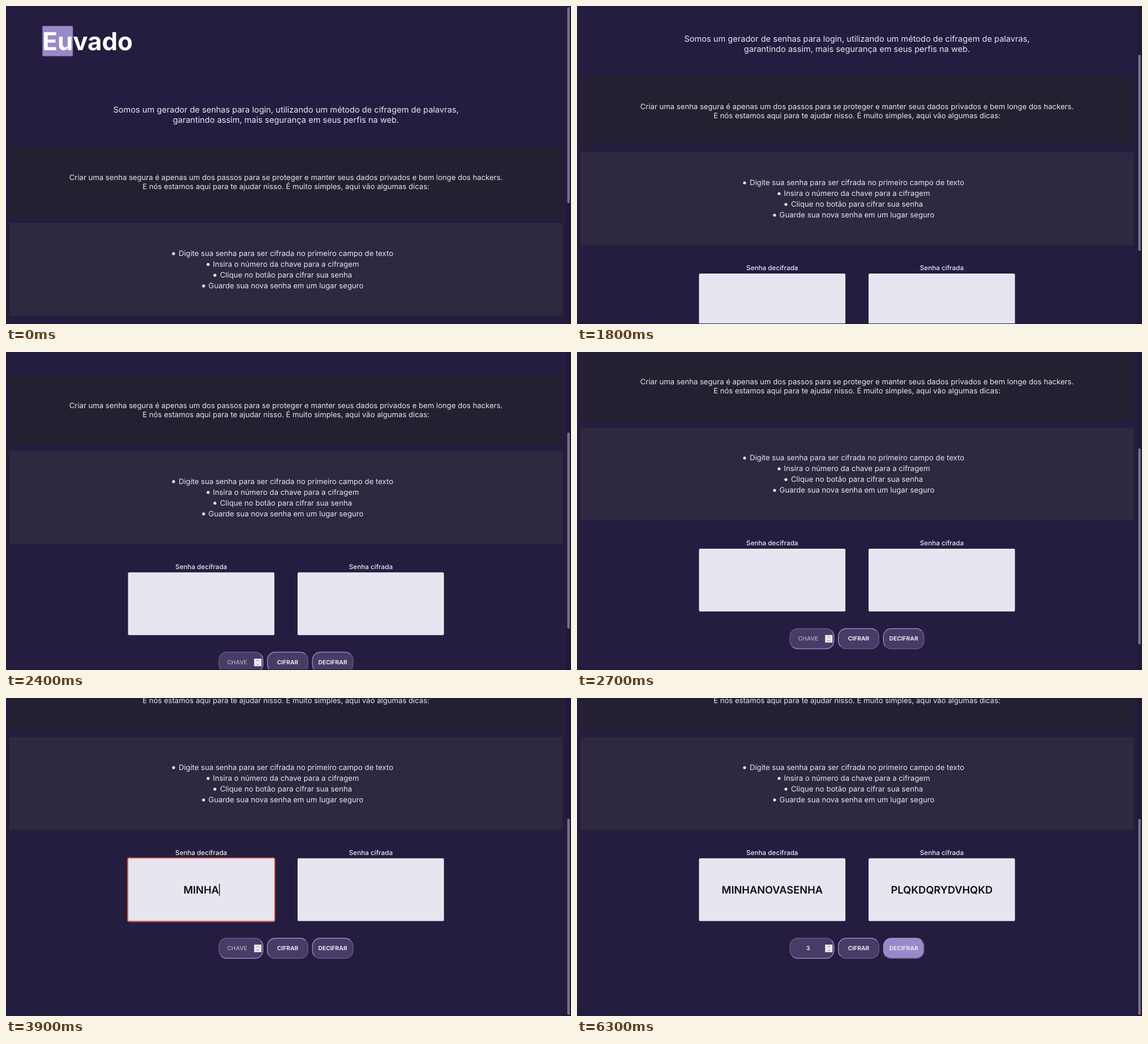
An HTML page that plays this animation: 998 px wide and 561 px high, repeating every 6600 ms.

```html
<!DOCTYPE html>
<html lang="pt">
<head>
<meta charset="utf-8">
<title>Euvado</title>
<style>
html, body { margin: 0; width: 100%; height: 100%; overflow: hidden; background: #251d40; }
svg { display: block; width: 998px; height: 561px; font-family: Inter, "Noto Sans", sans-serif; }
text { text-anchor: middle; fill: #e9e7ef; text-rendering: geometricPrecision; }
</style>
</head>
<body>
<svg id="stage" viewBox="0 0 998 561" xmlns="http://www.w3.org/2000/svg"></svg>
<script>
const NS = 'http://www.w3.org/2000/svg';
const LOOP = 6600, STEP = 300, START = 1200;
const SCROLL_STEP = 41.64, SCROLL_MAX = 314.1, THUMB_RATIO = 0.672;
const MID = 494.5, PLAIN_X = 344.8, CIPHER_X = 644.4;
const BRIGHT = '#9286c1', DIM = '#635986', HOVER = '#988ac8', FILL = '#483b66';
const PASSWORD = 'MINHANOVASENHA', KEY = 3;

const stage = document.getElementById('stage');

function add(parent, tag, attrs, content) {
  const el = document.createElementNS(NS, tag);
  for (const name in attrs) el.setAttribute(name, attrs[name]);
  if (content) el.textContent = content;
  parent.appendChild(el);
  return el;
}

const rect = (parent, x, y, width, height, fill, rx = 0) =>
  add(parent, 'rect', { x, y, width, height, fill, rx });

const label = (parent, x, y, size, content, weight = 400) =>
  add(parent, 'text', { x, y, 'font-size': size, 'font-weight': weight }, content);

const show = (el, on) => el.setAttribute('visibility', on ? 'visible' : 'hidden');

// Rounded control whose border is split along the diagonal, like inset/outset.
function control(x, y, w, h, upper, lower) {
  const r = 13.8, k = r * (1 - Math.SQRT1_2), b = 0.75;
  x += b; y += b; w -= 2 * b; h -= 2 * b;
  const body = rect(page, x, y, w, h, FILL, r);
  const arc = (px, py) => `A${r} ${r} 0 0 1 ${px} ${py}`;
  const edge = (d, stroke) =>
    add(page, 'path', { d, stroke, fill: 'none', 'stroke-width': 1.5 });
  edge(`M${x + k} ${y + h - k}${arc(x, y + h - r)}V${y + r}${arc(x + r, y)}` +
       `H${x + w - r}${arc(x + w - k, y + k)}`, upper);
  edge(`M${x + w - k} ${y + k}${arc(x + w, y + r)}V${y + h - r}${arc(x + w - r, y + h)}` +
       `H${x + r}${arc(x + k, y + h - k)}`, lower);
  return body;
}

function caesar(word, key) {
  return [...word].map(c => String.fromCharCode((c.charCodeAt(0) - 65 + key) % 26 + 65)).join('');
}

rect(stage, 0, 0, 998, 561, '#251d40');
const page = add(stage, 'g', {});

// Heading and introduction
rect(page, 64.3, 35.2, 53.8, 53.2, HOVER, 2);
const title = label(page, 64.3, 78, 43.8, 'Euvado', 700);
title.style.textAnchor = 'start';
title.style.fill = '#fff';
label(page, MID, 188, 14.58, 'Somos um gerador de senhas para login, utilizando um método de cifragem de palavras,');
label(page, MID, 205.6, 14.58, 'garantindo assim, mais segurança em seus perfis na web.');

// Panels
rect(page, 6, 250, 977.5, 121, '#252031');
label(page, MID, 306.8, 13.12, 'Criar uma senha segura é apenas um dos passos para se proteger e manter seus dados privados e bem longe dos hackers.');
label(page, MID, 323, 13.12, 'E nós estamos aqui para te ajudar nisso. É muito simples, aqui vão algumas dicas:');
rect(page, 6, 383, 977.5, 163.3, '#2e2840');
[
  [296, 'Digite sua senha para ser cifrada no primeiro campo de texto'],
  [357, 'Insira o número da chave para a cifragem'],
  [369, 'Clique no botão para cifrar sua senha'],
  [349, 'Guarde sua nova senha em um lugar seguro']
].forEach(([cx, content], i) => {
  add(page, 'circle', { cx, cy: 436.9 + i * 19, r: 2.6, fill: '#e9e7ef' });
  label(page, MID, 441.2 + i * 19, 13.15, content);
});

// Text fields
function field(x, cx, name) {
  label(page, cx, 590.9, 11.69, name, 500);
  rect(page, x - 0.4, 596.7, 259.8, 112, '#211a3a', 3);
  rect(page, x, 596.9, 258.6, 110.8, '#e7e5ef', 2.2);
  const value = label(page, cx, 659, 18.26, '', 600);
  value.style.fill = '#0c0a12';
  return value;
}
const plain = field(215.5, PLAIN_X, 'Senha decifrada');
const cipher = field(515, CIPHER_X, 'Senha cifrada');
const ring = add(page, 'rect', {
  x: 214.7, y: 596.1, width: 260.2, height: 112.4, rx: 3,
  fill: 'none', stroke: '#dd5a35', 'stroke-width': 1.6
});
const caret = rect(page, 0, 642, 1.4, 21, '#0c0a12');

// Key input and buttons
control(375.5, 737, 79, 37.2, DIM, BRIGHT);
const key = label(page, 408.3, 759.3, 10.23, 'CHAVE', 600);
rect(page, 438.3, 749.2, 13, 13.3, '#ececee');
add(page, 'path', {
  d: 'M442.4 754l2.4-2.4 2.4 2.4M442.4 757.8l2.4 2.4 2.4-2.4',
  fill: 'none', stroke: '#77757c', 'stroke-width': 1
});
const encodeBtn = control(461, 737, 73, 37.2, BRIGHT, DIM);
label(page, 497.5, 759.3, 10.23, 'CIFRAR', 700);
const decodeBtn = control(540.6, 737, 73, 37.2, BRIGHT, DIM);
label(page, 577.1, 759.3, 10.23, 'DECIFRAR', 700);

// Scrollbar and lower edge
rect(stage, 989, 0, 9, 561, '#201937');
const thumb = rect(stage, 991.4, 2, 4.4, 346, '#77728a', 2.2);
rect(stage, 0, 560, 998, 1, '#1c1631');

function draw(ms) {
  const t = ms % LOOP;
  const n = t < START ? 0 : Math.floor((t - START) / STEP) + 1;
  const scroll = Math.min(n * SCROLL_STEP, SCROLL_MAX);
  page.setAttribute('transform', `translate(0 ${-scroll})`);
  thumb.setAttribute('y', 2 + scroll * THUMB_RATIO);

  // Typing runs one word part at a time
  const typed = t < 3600 ? 0 : t < 3900 ? 2 : t < 4200 ? 5 : t < 4500 ? 9 : 14;
  plain.textContent = PASSWORD.slice(0, typed);
  const focused = t >= 3600 && t < 4800;
  show(ring, focused);
  show(caret, focused);
  if (focused) caret.setAttribute('x', PLAIN_X + plain.getComputedTextLength() / 2 + 0.2);

  const keyed = t >= 5100;
  key.textContent = keyed ? KEY : 'CHAVE';
  key.setAttribute('font-weight', keyed ? 700 : 600);
  key.style.fill = keyed ? '#e9e7ef' : '#a79fb9';

  cipher.textContent = t >= 5700 ? caesar(PASSWORD, KEY) : '';
  encodeBtn.setAttribute('fill', t >= 5400 && t < 6000 ? HOVER : FILL);
  decodeBtn.setAttribute('fill', t >= 6300 ? HOVER : FILL);
}

const begin = performance.now();
function tick() {
  draw(performance.now() - begin);
  requestAnimationFrame(tick);
}
tick();
</script>
</body>
</html>
```
